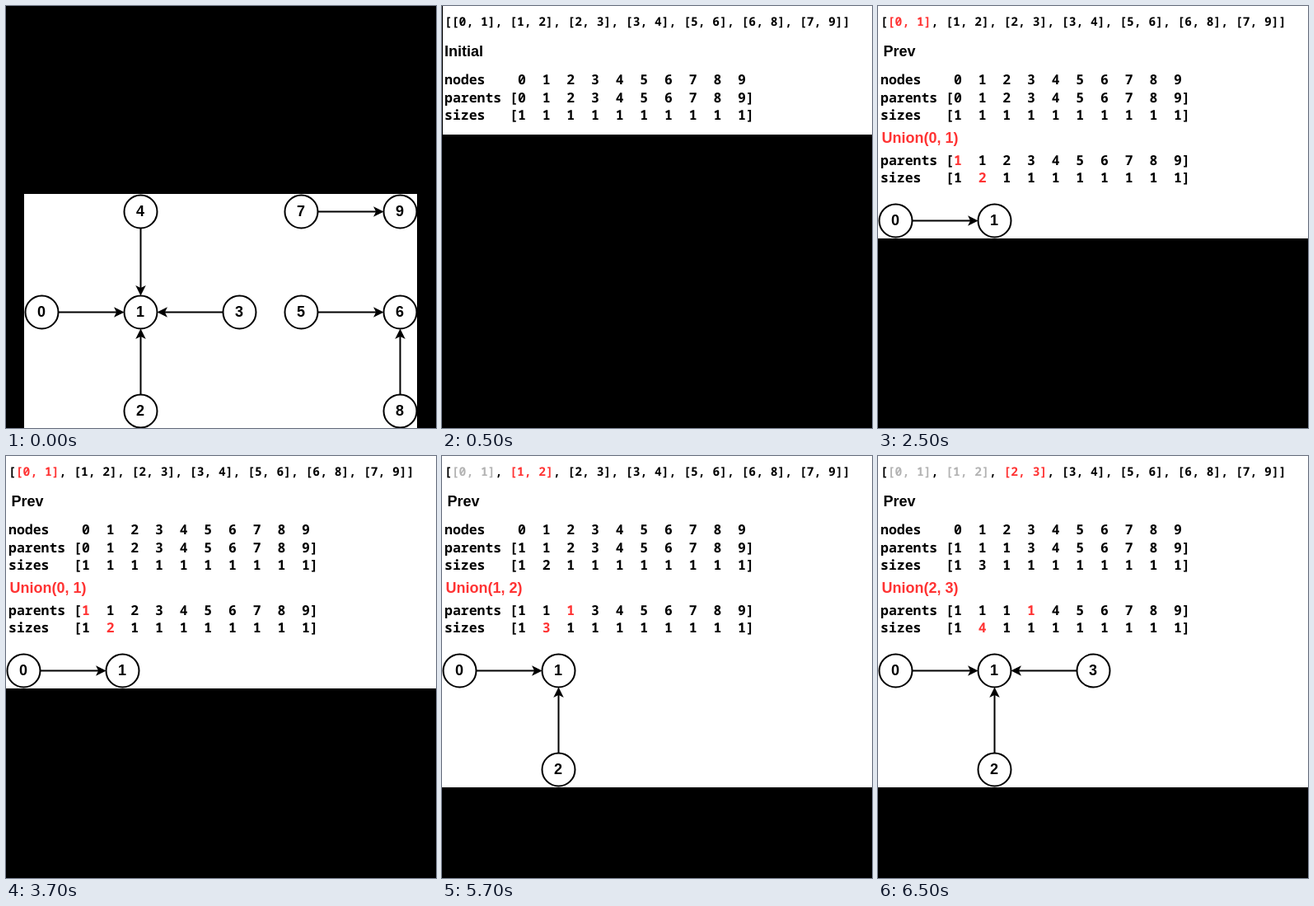
An HTML page that plays this animation: 522x512 px, repeating every 8 s.

```html
<!DOCTYPE html>
<html lang="en">
<head>
<meta charset="utf-8">
<title>Union find by size</title>
<style>
html, body { margin: 0; width: 100%; height: 100%; overflow: hidden; background: #000; }
svg { display: block; width: 522px; height: 512px; }
text { font: bold 18px "Liberation Sans", Arial, sans-serif; white-space: pre; }
.mono { font-family: "Noto Sans Mono", "DejaVu Sans Mono", monospace; font-weight: 600; text-rendering: geometricPrecision; }
.list { font-size: 14.66px; }
.table { font-size: 16.49px; }
.node { text-anchor: middle; }
.hot { fill: #f33; }
.done { fill: #b3b3b3; }
.ink { fill: none; stroke: #000; stroke-width: 2; stroke-miterlimit: 10; }
.head { fill: #000; }

/* Later scenes cover earlier ones until the loop restarts. */
.scene { animation: 8s step-end infinite; }
#scene1 { animation-name: show1; }
#scene2 { animation-name: show2; }
#scene3 { animation-name: show3; }
#scene4 { animation-name: show4; }
@keyframes show1 { 0% { visibility: hidden } 6.25%, 100% { visibility: visible } }
@keyframes show2 { 0% { visibility: hidden } 31.25%, 100% { visibility: visible } }
@keyframes show3 { 0% { visibility: hidden } 56.25%, 100% { visibility: visible } }
@keyframes show4 { 0% { visibility: hidden } 81.25%, 100% { visibility: visible } }
</style>
</head>
<body>
<svg id="stage" viewBox="0 0 522 512"></svg>
<script>
const R = 20;
const PAIRS = ['01', '12', '23', '34', '56', '68', '79'].map(p => [...p].map(Number));
// Children take their places around a root in this order: west, south, east, north.
const SIDES = [[-120, 0], [0, 120], [120, 0], [0, -122]];
const NODES = [...Array(10).keys()];

const text = (x, y, str, cls = '') => `<text x="${x}" y="${y}" class="${cls}">${str}</text>`;
const span = (str, cls) => cls ? `<tspan class="${cls}">${str}</tspan>` : str;
const rect = (x, y, w, h, fill = '#fff') =>
  `<rect x="${x}" y="${y}" width="${w}" height="${h}" fill="${fill}"/>`;

function node(n, [x, y]) {
  return `<circle class="ink" cx="${x}" cy="${y}" r="${R}"/>` +
    text(x - 0.5, y + 5.5, n, 'node');
}

// Arrow drawn along the x axis, then turned towards its end node.
function arrow([x1, y1], [x2, y2]) {
  const length = Math.hypot(x2 - x1, y2 - y1);
  const angle = Math.atan2(y2 - y1, x2 - x1) * 180 / Math.PI;
  const tip = length - R - 2.24;
  return `<g transform="translate(${x1} ${y1}) rotate(${angle})">` +
    `<path class="ink" d="M${R} 0H${tip - 6}"/>` +
    `<path class="ink head" d="M${tip} 0l-8 4 2-4-2-4z"/></g>`;
}

function tree(root, at, parents) {
  const children = NODES.filter(n => n !== root && parents[n] === root);
  return node(root, at) + children.map((n, i) => {
    const place = [at[0] + SIDES[i][0], at[1] + SIDES[i][1]];
    return node(n, place) + arrow(place, at);
  }).join('');
}

// Union by size; on a tie the second root wins.
function union(parents, sizes, [a, b]) {
  let child = parents[a], root = parents[b];
  if (sizes[child] > sizes[root]) [child, root] = [root, child];
  parents[child] = root;
  sizes[root] += sizes[child];
  return [child, root];
}

function pairList(active) {
  const items = PAIRS.map(([a, b], i) =>
    span(`[${a}, ${b}]`, i === active ? 'hot' : i < active ? 'done' : ''));
  return text(3, 24, `[${items.join(', ')}]`, 'mono list');
}

function row(y, label, values, hot) {
  const cells = values.map((v, i) => span(v, i === hot ? 'hot' : '')).join('  ');
  return text(3, y, `${label.padEnd(8)}[${cells}]`, 'mono table');
}

function rows(y, parents, sizes, child, root) {
  return row(y, 'parents', parents, child) + row(y + 21, 'sizes', sizes, root);
}

function table(parents, sizes) {
  return text(3, 95, 'nodes    ' + NODES.join('  '), 'mono table') + rows(117, parents, sizes);
}

function scene(i, body) {
  return `<g class="scene" id="scene${i}">${rect(0, 0, 522, 512, '#000')}${body}</g>`;
}

const parents = [...NODES];
const sizes = NODES.map(() => 1);
const steps = [
  scene(1, rect(1, 0, 521, 156) + pairList(-1) + text(3, 61, 'Initial') + table(parents, sizes))
];

PAIRS.forEach((pair, i) => {
  const before = table(parents, sizes);
  const [child, root] = union(parents, sizes, pair);
  if (i > 2) return;
  steps.push(scene(i + 2,
    rect(0, 0, 522, i ? 402 : 282) + pairList(i) + text(6.5, 61, 'Prev') + before +
    text(4.5, 166, `Union(${pair.join(', ')})`, 'hot') +
    rows(193, parents, sizes, child, root) + tree(root, [141.5, 260.5], parents)));
});

const sheet = rect(22, 228, 477, 284);
const forest = tree(1, [163.5, 371.5], parents) + tree(6, [478.5, 371.5], parents) +
  tree(9, [478.5, 249.5], parents);

document.getElementById('stage').innerHTML =
  `<clipPath id="sheet">${sheet}</clipPath>` +
  scene(0, `<g clip-path="url(#sheet)">${sheet}${forest}</g>`) + steps.join('');
</script>
</body>
</html>
```
